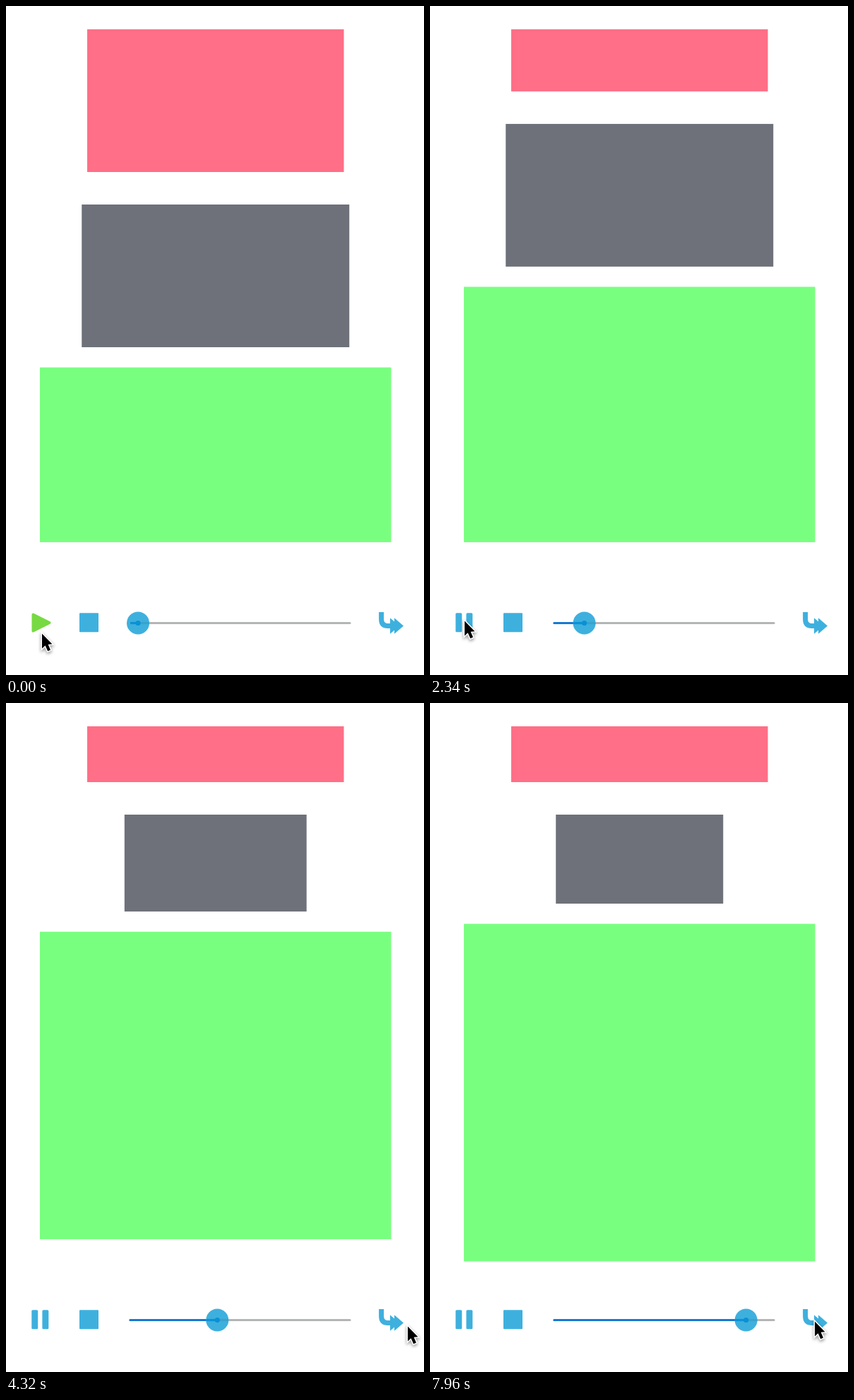
Animation of 592 by 947 pixels, one loop 8 s. Source, as an HTML page with a canvas:

```html
<!DOCTYPE html>
<html lang="en">
<head>
<meta charset="utf-8">
<title>Animation player</title>
<style>
  html, body { margin: 0; width: 100%; height: 100%; overflow: hidden; background: #fff; }
  canvas { display: block; }
</style>
</head>
<body>
<canvas id="stage" width="592" height="947"></canvas>
<script>
const ctx = document.getElementById('stage').getContext('2d');
const LOOP = 8000;
const START = 1566;
const BLUE = '#3eb0de';
const CENTER = 296.75;

// [time, x, y] of the pointer tip
const POINTER = [
  [0, 51, 888], [150, 51, 888], [700, 49, 870], [2600, 49, 870],
  [3340, 86, 861], [4100, 525, 872], [4270, 569, 882], [4420, 569, 882],
  [4900, 548, 876], [5250, 545, 875], [LOOP, 545, 875]
];

const clamp = v => Math.min(1, Math.max(0, v));
const mix = (a, b, k) => a + (b - a) * k;
const span = (t, from, length) => clamp((t - from) / length);
const easeOut = (u, p) => 1 - Math.pow(1 - u, p);
const easeInOut = (u, p) =>
  u < 0.5 ? Math.pow(2 * u, p) / 2 : 1 - Math.pow(2 - 2 * u, p) / 2;

function rect(color, x, y, w, h) {
  ctx.fillStyle = color;
  ctx.fillRect(x, y, w, h);
}

function roundRect(color, x, y, w, h, r) {
  ctx.fillStyle = color;
  ctx.beginPath();
  ctx.roundRect(x, y, w, h, r);
  ctx.fill();
}

function disc(color, x, y, r) {
  ctx.fillStyle = color;
  ctx.beginPath();
  ctx.arc(x, y, r, 0, Math.PI * 2);
  ctx.fill();
}

function line(color, x1, x2, y, width, cap) {
  ctx.strokeStyle = color;
  ctx.lineWidth = width;
  ctx.lineCap = cap;
  ctx.beginPath();
  ctx.moveTo(x1, y);
  ctx.lineTo(x2, y);
  ctx.stroke();
}

function polygon(points) {
  ctx.beginPath();
  points.forEach(([x, y]) => ctx.lineTo(x, y));
  ctx.closePath();
}

function drawBoxes(t) {
  const shrink = easeInOut(span(t, START, 1000), 2.42);
  const narrow = easeOut(span(t, START + 1000, 3000), 2.18);
  const grow = easeOut(span(t, START + 4000, 5000), 2);

  const redH = mix(202, 79, shrink);
  rect('#ff6f87', 115, 33, 363.5, redH);

  const grayY = 33 + redH + 46;
  const grayW = mix(379, 237, narrow);
  const grayH = mix(202, 126, narrow);
  rect('#6e7179', CENTER - grayW / 2, grayY, grayW, grayH);

  const greenY = grayY + grayH + 28.6;
  rect('#79ff80', 48, greenY, 497.5, 759 + 43 * grow - greenY);
}

function drawPlay(t) {
  const press = span(t, 1280, 160);
  const color = `rgb(${mix(119, 138, press)},${mix(218, 181, press)},${mix(66, 122, press)})`;
  const inset = press * 0.7;
  polygon([[38.5 + inset, 861.5 + inset], [61.5 - inset, 873], [38.5 + inset, 884.5 - inset]]);
  ctx.fillStyle = ctx.strokeStyle = color;
  ctx.lineWidth = 4;
  ctx.lineJoin = 'round';
  ctx.fill();
  ctx.stroke();
}

function drawPause() {
  roundRect(BLUE, 36.3, 859.3, 8.9, 27, 1.5);
  roundRect(BLUE, 51.4, 859.3, 8.9, 27, 1.5);
}

function drawRing(t) {
  if (t < 1280 || t > 1700) return;
  ctx.globalAlpha = 0.8 * (1 - span(t, 1480, 220));
  ctx.strokeStyle = '#77da42';
  ctx.lineWidth = 2;
  ctx.beginPath();
  ctx.arc(48.2, 872.8, mix(18, 28, span(t, 1280, 400)), 0, Math.PI * 2);
  ctx.stroke();
  ctx.globalAlpha = 1;
}

function drawSlider(t) {
  const y = 873.5;
  const x = 187 + Math.max(0, t - START) * 0.04075;
  line('#b4b5b5', 176, 487, y, 3.2, 'round');
  line('#1679d2', 176, x, y, 3.2, 'round');
  disc(BLUE, x, y, 16);
  line('#0a92d6', Math.max(x - 15.8, 176), x, y, 3.2, 'butt');
  line('#3ba2ca', x, x + 15.8, y, 3.2, 'butt');
  disc('#0a90d4', x, y, 3.6);
}

function drawSkip() {
  ctx.strokeStyle = ctx.fillStyle = BLUE;
  ctx.lineWidth = 7;
  ctx.lineCap = 'butt';
  ctx.beginPath();
  ctx.moveTo(531.6, 858);
  ctx.lineTo(531.6, 868);
  ctx.quadraticCurveTo(531.6, 877.5, 541, 877.5);
  ctx.lineTo(546, 877.5);
  ctx.stroke();
  for (const x of [544, 550]) {
    polygon([[x, 866.3], [x + 13, 877.5], [x, 888.7]]);
    ctx.fill();
  }
}

function pointerAt(t) {
  const i = Math.max(1, POINTER.findIndex(p => p[0] >= t));
  const [a, b] = [POINTER[i - 1], POINTER[i]];
  const k = easeInOut(span(t, a[0], b[0] - a[0]), 1.4);
  return [mix(a[1], b[1], k), mix(a[2], b[2], k)];
}

function drawPointer(t) {
  const [x, y] = pointerAt(t);
  ctx.save();
  ctx.translate(x, y);
  polygon([[0, 0.5], [0, 21.5], [4.6, 17.2], [8.2, 25.3], [12, 23.6], [8.6, 15.7], [14.4, 15.2]]);
  ctx.lineJoin = 'miter';
  ctx.strokeStyle = '#fff';
  ctx.lineWidth = 3;
  ctx.shadowColor = 'rgba(0,0,0,.45)';
  ctx.shadowBlur = 4;
  ctx.shadowOffsetY = 2;
  ctx.stroke();
  ctx.shadowColor = 'transparent';
  ctx.fillStyle = '#000';
  ctx.fill();
  ctx.restore();
}

function draw(t) {
  rect('#fff', 0, 0, 592, 947);
  drawBoxes(t);
  if (t < START) drawPlay(t);
  else drawPause();
  drawRing(t);
  roundRect(BLUE, 104, 859.3, 27, 27, 1);
  drawSlider(t);
  drawSkip();
  drawPointer(t);
}

const origin = performance.now();
function tick() {
  draw((performance.now() - origin) % LOOP);
  requestAnimationFrame(tick);
}
tick();
</script>
</body>
</html>
```
